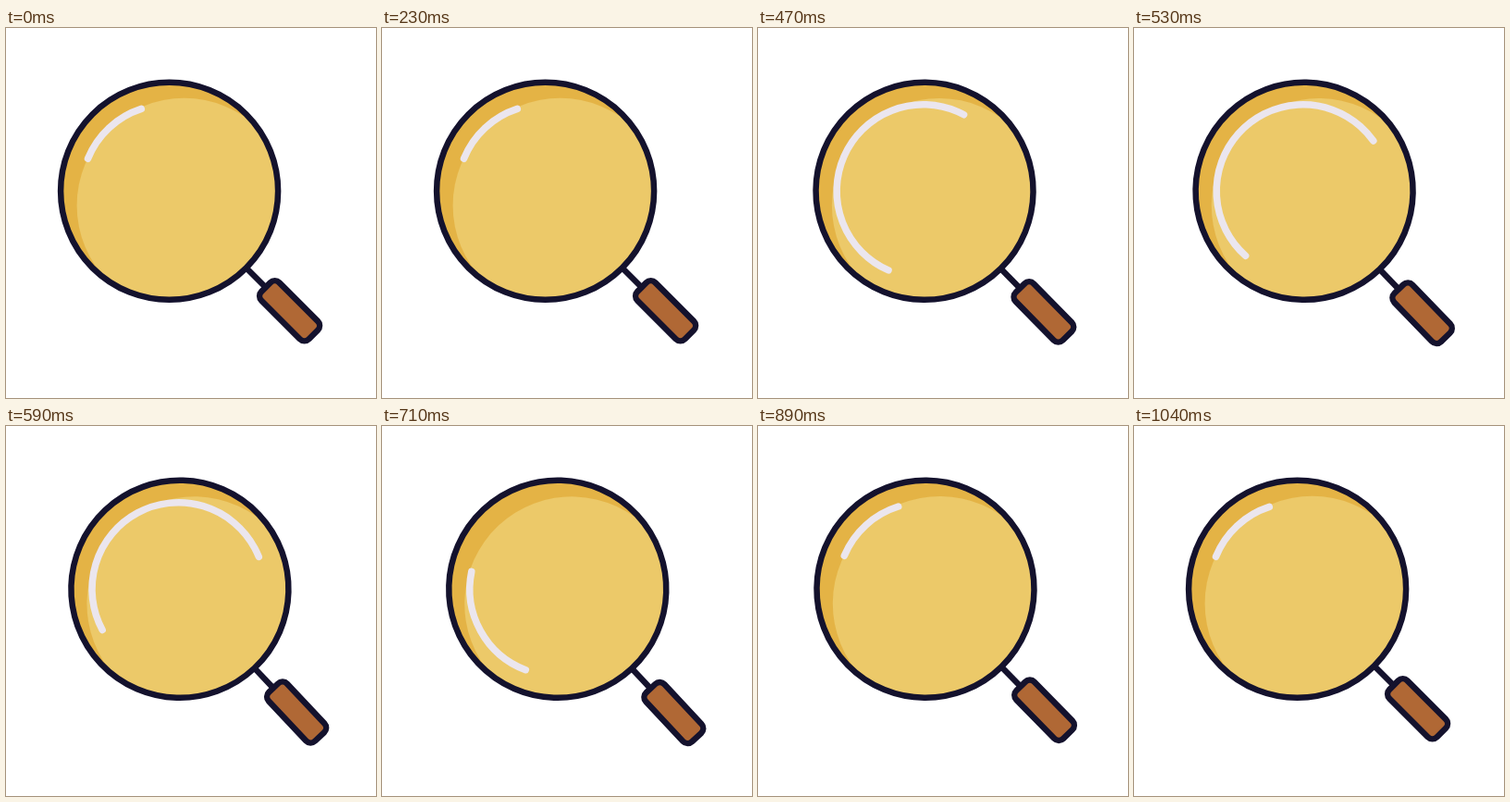
These frames come from a looping animation (400x400 px, 1100 ms). An HTML page:

```html
<!DOCTYPE html>
<html lang="en">
<head>
<meta charset="utf-8">
<title>Magnifier</title>
<style>
  html, body { margin: 0; width: 100%; height: 100%; overflow: hidden; background: #fff; }
  svg { display: block; width: 100vw; height: 100vh; }
  .ink { stroke: #14122d; stroke-width: 6.5; stroke-linejoin: round; }
</style>
</head>
<body>
<svg viewBox="0 0 400 400">
  <clipPath id="rim"><circle r="117.5"/></clipPath>
  <!-- the origin is the centre of the lens -->
  <g id="glass">
    <path class="ink" d="M82 82 L106 106"/>
    <rect class="ink" x="-36.3" y="-13.7" width="72.6" height="27.4" rx="7"
          fill="#b06835" transform="translate(130 129.5) rotate(45)"/>
    <circle r="117.5" fill="#e4b345"/>
    <circle cx="16" cy="15.5" r="116" fill="#ecc969" clip-path="url(#rim)"/>
    <circle id="shine" r="93.5" pathLength="360" fill="none"
            stroke="#ebe6ee" stroke-width="7.5" stroke-linecap="round"/>
    <circle class="ink" r="117.5" fill="none"/>
  </g>
</svg>
<script>
  const LOOP = 1100, HOLD = 230, STEP = 30, LAST = 28;
  const glass = document.getElementById('glass');
  const shine = document.getElementById('shine');

  // Smooth 0 to 1 between two steps
  function ease(k, from, to) {
    const u = Math.min(1, Math.max(0, (k - from) / (to - from)));
    return u * u * (3 - 2 * u);
  }

  function draw(now) {
    const t = now % LOOP;
    const k = t < HOLD ? 0 : Math.min(LAST, Math.floor((t - HOLD) / STEP) + 1);

    // The glass slides right with a slight tilt, then returns
    const sway = ease(k, 5.8, 15.6) - ease(k, 15.6, 27.5);
    glass.setAttribute('transform',
      `translate(${176.6 + 13.7 * sway} 176.3) rotate(${2 * sway})`);

    // The shine makes two turns, growing in the first and shrinking in the second
    const first = ease(k, 1, 10.4), second = ease(k, 12.1, 19.1);
    const middle = 227 + 360 * (first + second);
    const length = 50 + 143 * (first - second);
    shine.setAttribute('transform', `translate(-1.4 0) rotate(${middle - length / 2})`);
    shine.setAttribute('stroke-dasharray', `${length} ${360 - length}`);
  }

  const start = performance.now();
  function tick() {
    draw(performance.now() - start);
    requestAnimationFrame(tick);
  }
  tick();
</script>
</body>
</html>
```
